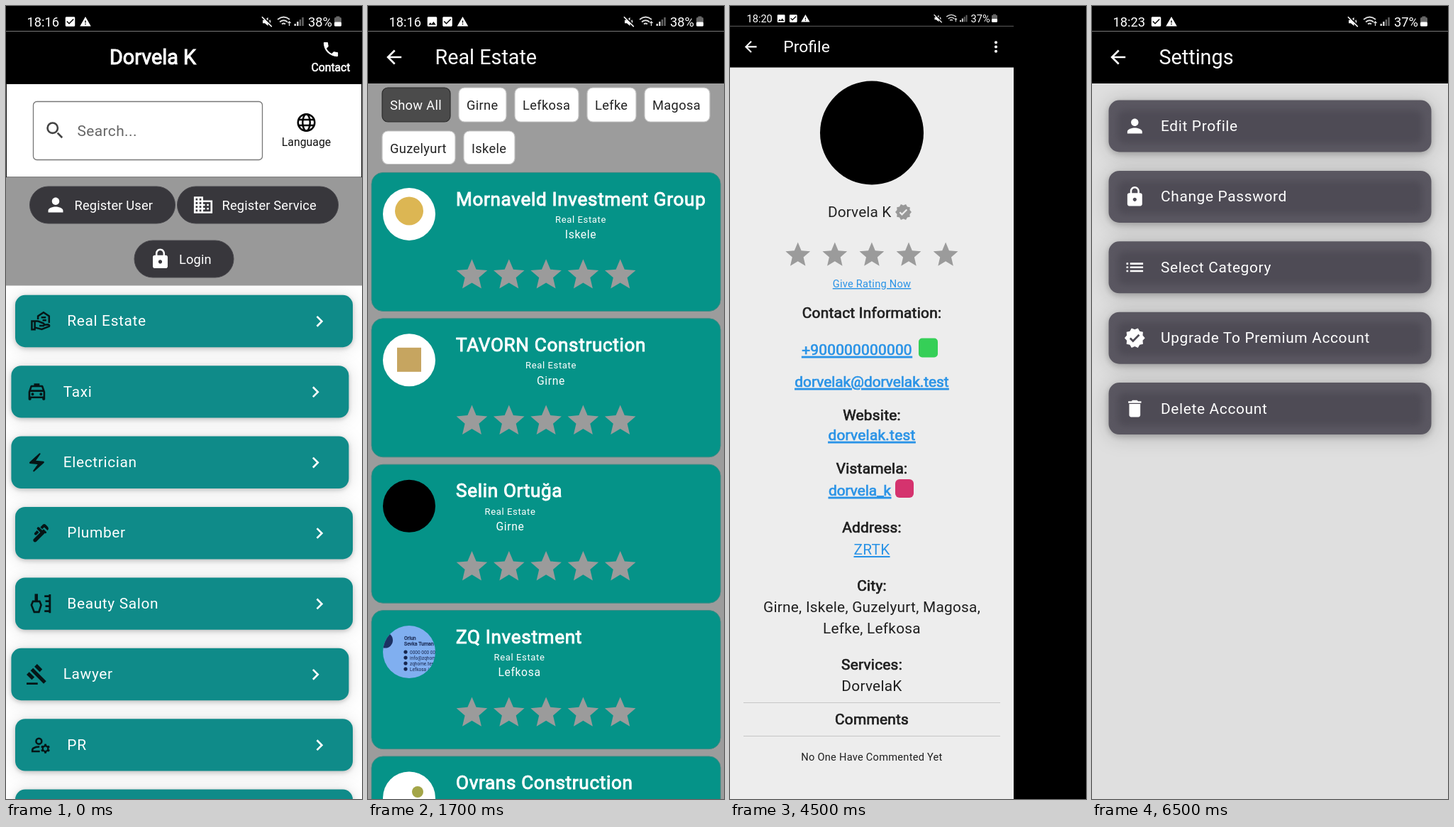
An HTML page that plays this animation: 502 px wide and 1116 px high, repeating every 8000 ms.

```html
<!DOCTYPE html>
<html lang="en">
<head>
<meta charset="utf-8">
<title>App tour</title>
<style>
  html, body { margin: 0; width: 100%; height: 100%; overflow: hidden; background: #000; }
  #strip { display: flex; width: 2510px; height: 1116px; animation: cut 8s step-end infinite; }
  svg { flex: none; width: 502px; height: 1116px; overflow: hidden; }
  text { font-family: Roboto, "Noto Sans", sans-serif; white-space: pre; }
  .tile { filter: drop-shadow(0 2px 3px #0003) drop-shadow(0 1px 11px #0002); }
  .panel { filter: drop-shadow(0 3px 4px #0003) drop-shadow(0 2px 14px #0003); }
  .soft { filter: blur(5px); }
  @keyframes cut {
    0% { transform: translateX(0); }
    6.25% { transform: translateX(-502px); }
    31.25% { transform: translateX(-1004px); }
    56.25% { transform: translateX(-1506px); }
    81.25%, 100% { transform: translateX(-2008px); }
  }
</style>
</head>
<body>
<div id="strip"></div>
<script>
const GEAR = 'M20.75 16c0-.22-.03-.42-.06-.63l1.14-1.01-1-1.73-1.45.49c-.32-.27-.68-.48-1.08-.63L18 11h-2l-.3 1.49c-.4.15-.76.36-1.08.63l-1.45-.49-1 1.73 1.14 1.01c-.03.21-.06.41-.06.63s.03.42.06.63l-1.14 1.01 1 1.73 1.45-.49c.32.27.68.48 1.08.63L16 21h2l.3-1.49c.4-.15.76-.36 1.08-.63l1.45.49 1-1.73-1.14-1.01c.03-.21.06-.41.06-.63zM17 18c-1.1 0-2-.9-2-2s.9-2 2-2 2 .9 2 2-.9 2-2 2z';

const fill = d => `<path d="${d}" fill="currentColor" fill-rule="evenodd"/>`;
const line = (d, w = 2) => `<path d="${d}" fill="none" stroke="currentColor" stroke-width="${w}"/>`;

// Icons on a 24 x 24 grid
const ICONS = {
  phone: fill('M6.62 10.79c1.44 2.83 3.76 5.14 6.59 6.59l2.2-2.2c.27-.27.67-.36 1.02-.24 1.12.37 2.33.57 3.57.57.55 0 1 .45 1 1V20c0 .55-.45 1-1 1-9.39 0-17-7.61-17-17 0-.55.45-1 1-1h3.5c.55 0 1 .45 1 1 0 1.25.2 2.45.57 3.57.11.35.03.74-.25 1.02z'),
  search: line('M14.8 14.8L19.8 19.8') + '<circle cx="9.5" cy="9.5" r="5.5" fill="none" stroke="currentColor" stroke-width="2"/>',
  globe: '<g fill="none" stroke="currentColor" stroke-width="1.9"><circle cx="12" cy="12" r="9"/><ellipse cx="12" cy="12" rx="4" ry="9"/><path d="M4 9h16M4 15h16"/></g>',
  person: fill('M12 12c2.21 0 4-1.79 4-4s-1.79-4-4-4-4 1.79-4 4 1.79 4 4 4zm0 2c-2.67 0-8 1.34-8 4v2h16v-2c0-2.66-5.33-4-8-4z'),
  office: fill('M12 7V3H2v18h20V7zM4 5h2v2H4zM4 9h2v2H4zM4 13h2v2H4zM4 17h2v2H4zM8 5h2v2H8zM8 9h2v2H8zM8 13h2v2H8zM8 17h2v2H8zM20 19h-8v-2h2v-2h-2v-2h2v-2h-2V9h8zM16 11h2v2h-2zM16 15h2v2h-2z'),
  lock: fill('M18 8h-1V6c0-2.76-2.24-5-5-5S7 3.24 7 6v2H6c-1.1 0-2 .9-2 2v10c0 1.1.9 2 2 2h12c1.1 0 2-.9 2-2V10c0-1.1-.9-2-2-2zm-6 9c-1.1 0-2-.9-2-2s.9-2 2-2 2 .9 2 2-.9 2-2 2zm3.1-9H8.9V6c0-1.71 1.39-3.1 3.1-3.1 1.71 0 3.1 1.39 3.1 3.1z'),
  gear: `<g transform="translate(-22 -20) scale(2)">${fill(GEAR)}</g>`,
  chevron: fill('M10 6 8.59 7.41 13.17 12l-4.58 4.59L10 18l6-6z'),
  back: fill('M20 11H7.83l5.59-5.59L12 4l-8 8 8 8 1.41-1.41L7.83 13H20z'),
  star: fill('M12 17.27L18.18 21l-1.64-7.03L22 9.24l-7.19-.61L12 2 9.19 8.63 2 9.24l5.46 4.73L5.82 21z'),
  badge: fill('M23 12l-2.44-2.79.34-3.69-3.61-.82-1.89-3.2L12 2.96 8.6 1.5 6.71 4.69 3.1 5.5l.34 3.7L1 12l2.44 2.79-.34 3.7 3.61.82L8.6 22.5l3.4-1.47 3.4 1.46 1.89-3.19 3.61-.82-.34-3.69zm-12.91 4.72l-3.8-3.81 1.48-1.48 2.32 2.33 5.85-5.87 1.48 1.48z'),
  list: fill('M3 7h2v2H3zM3 11h2v2H3zM3 15h2v2H3zM7 7h14v2H7zM7 11h14v2H7zM7 15h14v2H7z'),
  trash: fill('M6 19c0 1.1.9 2 2 2h8c1.1 0 2-.9 2-2V7H6zM19 4h-3.5l-1-1h-5l-1 1H5v2h14z'),
  more: fill('M10 6a2 2 0 1 0 4 0a2 2 0 1 0-4 0M10 12a2 2 0 1 0 4 0a2 2 0 1 0-4 0M10 18a2 2 0 1 0 4 0a2 2 0 1 0-4 0'),
  house: line('M9 10V6.6L15 2.6l6 4V14M12.5 8h5M14 11h4', 1.9) + line('M2.4 12h3.2v9H2.4zM6 12h3l6 2.4q1.4 1.2 0 2.6h-4.5M15.5 16l4.3-.4q2 .6 1.3 2l-8 3.2-7-1.8', 1.9),
  taxi: fill('M18.92 6.01C18.72 5.42 18.16 5 17.5 5H15V3H9v2H6.5c-.66 0-1.21.42-1.42 1.01L3 12v8c0 .55.45 1 1 1h1c.55 0 1-.45 1-1v-1h12v1c0 .55.45 1 1 1h1c.55 0 1-.45 1-1v-8zM6.85 7h10.29l1.04 3H5.81zM19 17H5v-5h14zM6 14.5a1.5 1.5 0 1 0 3 0a1.5 1.5 0 1 0-3 0M15 14.5a1.5 1.5 0 1 0 3 0a1.5 1.5 0 1 0-3 0'),
  bolt: fill('M14.69 2.21L4.33 11.49c-.64.58-.28 1.65.58 1.73L13 14l-4.85 6.76c-.22.31-.19.74.08 1.01.3.3.77.31 1.08.02l10.36-9.28c.64-.58.28-1.65-.58-1.73L11 10l4.85-6.76c.22-.31.19-.74-.08-1.01a.77.77 0 0 0-1.08-.02z'),
  wrench: fill('M19.28 4.93l-2.12-2.12c-.78-.78-2.05-.78-2.83 0L11.5 5.64l2.12 2.12 2.12-2.12 3.54 3.54a3 3 0 0 0 0-4.25zM5.49 13.77c.59.59 1.54.59 2.12 0l2.47-2.47-2.12-2.13-2.47 2.47c-.59.59-.59 1.54 0 2.13zM15.04 7.76l-1.42 1.42L10.44 6c-.59-.6-1.54-.6-2.12-.01a1.5 1.5 0 0 0 0 2.12l3.18 3.18-7.07 7.07c-.78.78-.78 2.05 0 2.83.78.78 2.05.78 2.83 0L16.45 12a1 1 0 1 0 1.41-1.41z'),
  beauty: fill('M5.5 1.5h3.4V9H5.5z') + line('M3.6 9.5h7.2l1.6 4-2.4 7.5H5L2 13.5z') + line('M21.8 2v20M22 4h-6M22 9.3h-5M22 14.7h-5M22 20h-6', 2.2),
  gavel: fill('M1 21h12v2H1zM5.24 8.07l2.83-2.83 14.14 14.14-2.83 2.83zM12.32 1l5.66 5.66-2.83 2.83-5.66-5.66zM3.83 9.48l5.66 5.66-2.83 2.83L1 12.31z'),
  staff: fill(GEAR) + '<circle cx="10" cy="8" r="3" fill="none" stroke="currentColor" stroke-width="2"/>' + line('M10.6 14Q6.600 13.800 3.900 15.600Q3 16.200 3 17.500V19H11'),
  image: fill('M21 19V5c0-1.1-.9-2-2-2H5c-1.1 0-2 .9-2 2v14c0 1.1.9 2 2 2h14c1.1 0 2-.9 2-2zM8.5 13.5l2.5 3.01L14.5 12l4.5 6H5z'),
  check: fill('M19 3H5c-1.1 0-2 .9-2 2v14c0 1.1.9 2 2 2h14c1.1 0 2-.9 2-2V5c0-1.1-.9-2-2-2zm-9 14l-5-5 1.41-1.41L10 14.17l7.59-7.59L19 8z'),
  warn: fill('M1 21h22L12 2zM13 18h-2v-2h2zM13 14h-2v-4h2z'),
  mute: fill('M4 9v6h4l6 5V4L8 9z') + line('M17 9q2 3 0 6') + '<path d="M3.500 2L22 20.500" stroke="#000" stroke-width="3.500"/>' + line('M2.500 3L21 21.500')
};

const icon = (name, cx, cy, size = 31.4, color = '#fff') =>
  `<g color="${color}" transform="translate(${cx - size / 2} ${cy - size / 2}) scale(${size / 24})">${ICONS[name]}</g>`;

const rect = (x, y, w, h, color, r = 0, more = '') =>
  `<rect x="${x}" y="${y}" width="${w}" height="${h}" rx="${r}" fill="${color}" ${more}/>`;

const disc = (x, y, r, color) => `<circle cx="${x}" cy="${y}" r="${r}" fill="${color}"/>`;

// mid: centred on x, bold: outlined regular weight
function text(s, x, y, size, { color = '#fff', gap = 0, mid, bold, under } = {}) {
  const edge = bold ? `stroke="${color}" stroke-width="${size * .036}"` : '';
  return `<text x="${x}" y="${y}" font-size="${size}" letter-spacing="${gap}" fill="${color}" ${edge}` +
    `${mid ? ' text-anchor="middle"' : ''}${under ? ' text-decoration="underline"' : ''}>${s}</text>`;
}

function statusBar(clock, charge, hasImage) {
  const marks = hasImage ? ['image', 'check', 'warn'] : ['check', 'warn'];
  const bars = [0, 1, 2, 3].map(i =>
    rect(406.5 + i * 3.6, 25 - i * 3, 2.4, 3 + i * 3, i < 2 ? '#ddd' : '#666')).join('');
  return rect(0, 0, 502, 109, '#000') + rect(0, 35, 502, 1, '#777') +
    text(clock, 29.500, 28.700, 18.300) +
    marks.map((m, i) => icon(m, 90.500 + i * 21.500, 22, m === 'warn' ? 17 : 18)).join('') +
    icon('mute', 368, 22, 18) +
    `<g fill="none" stroke="#ddd" stroke-width="1.700"><path d="M383 19q8.500-7 17 0M386 22.500q5.500-4.500 11 0M389 25.500q2.500-2 5 0"/><path d="M399.500 28v-6m-2 2l2-2 2 2" stroke-width="1.300"/></g>` +
    bars + text(charge, 426, 28.700, 18.300) +
    rect(463, 16, 10, 12.500, '#666', 1.500) + rect(465.500, 14.500, 5, 2, '#666') + rect(463, 22.500, 10, 6, '#fff', 1.500);
}

const titleBar = title => icon('back', 36.7, 72) + text(title, 94.5, 81.5, 28.76);

const stars = (x, y, size, step) =>
  [0, 1, 2, 3, 4].map(i => icon('star', x + i * step, y, size, '#9b9b9b')).join('');

const pill = ([name, label, x, y, w]) =>
  rect(x, y, w, 52, '#38373c', 26, 'stroke="#47464b"') +
  icon(name, x + 36.5, y + 26) + text(label, x + 63, y + 33, 18.3, { gap: .15 });

const SERVICES = [['house', 'Real Estate'], ['taxi', 'Taxi'], ['bolt', 'Electrician'], ['wrench', 'Plumber'],
  ['beauty', 'Beauty Salon'], ['gavel', 'Lawyer'], ['staff', 'PR'], ['', '']];

function home(status, pills, shifts) {
  const rows = SERVICES.map(([name, label], i) => {
    const x = 13 + shifts[i] * 5.6, y = 406.8 + i * 99.4;
    return rect(x, y, 476, 73.4, '#0f8b89', 14, 'class="tile"') + (name
      ? icon(name, x + 36, y + 36.7, 31.4, '#061516') +
        text(label, x + 73.3, y + 43.4, 20.9, { gap: .65 }) + icon('chevron', x + 429, y + 37)
      : '');
  }).join('');
  return rect(0, 0, 502, 1116, '#fff') + rows + status +
    text('Dorvela K', 207, 81.5, 28.76, { mid: 1, bold: 1 }) +
    icon('phone', 458, 61, 27) + text('Contact', 458, 91.5, 15.7, { mid: 1, bold: 1 }) +
    rect(.5, 109.5, 501, 131.5, '#fff', 0, 'stroke="#111"') +
    rect(38.5, 134.5, 323, 82, '#fff', 5, 'stroke="#777" stroke-width="1.3"') +
    icon('search', 69, 175, 31.4, '#444') + text('Search...', 100.5, 183, 20.9, { color: '#666', gap: .4 }) +
    icon('globe', 423.5, 164, 31.4, '#000') + text('Language', 423.5, 197, 15.7, { color: '#111', mid: 1, gap: .1 }) +
    rect(0, 241.5, 502, 152, '#999') + pills.map(pill).join('');
}

const CHIPS = [['Show All', 20, 115, 96], ['Girne', 128, 115, 67], ['Lefkosa', 207, 115, 90], ['Lefke', 309, 115, 69],
  ['Magosa', 390, 115, 92], ['Guzelyurt', 20, 176, 103], ['Iskele', 135, 176, 72]];

const chip = ([label, x, y, w], i) =>
  rect(x, y, w, y < 150 ? 48 : 46.5, i ? '#fff' : '#4b4b4b', 8, `stroke="${i ? '#c4c4c4' : '#2b2b2b'}" stroke-width="1.2"`) +
  text(label, x + 11, y + 30.6, 18.3, { color: i ? '#222' : '#fff', gap: .33 });

function cardFace() {
  const lines = ['0000 000 00 00', 'info@zqhome', 'zqhome.test', 'Lefkosa /'];
  return disc(58, 58.5, 37, '#80aff0') + '<g clip-path="url(#round)">' + disc(24, 42, 11, '#1c3162') +
    ['Orlun', 'Sevka Tuman'].map((s, i) => text(s, 51, 41 + i * 8, 7, { color: '#16254c', bold: 1 })).join('') +
    lines.map((s, i) => disc(53, 58.5 + i * 8, 2.6, '#16254c') + text(s, 59, 61 + i * 8, 6.5, { color: '#16254c' })).join('') + '</g>';
}

const white = disc(58, 58.5, 37, '#fff');
const FIRMS = [
  ['Mornaveld Investment Group', 'Iskele', 300, white + disc(58, 54, 20, '#dcb653')],
  ['TAVORN Construction', 'Girne', 258, white + rect(41, 41, 34, 34, '#c6a560')],
  ['Selin Ortuğa', 'Girne', 200.5, disc(58, 58.5, 37, '#000')],
  ['ZQ Investment', 'Lefkosa', 213.5, cardFace()],
  ['Ovrans Construction', '', 248, white + disc(70, 50, 8, '#a3a548')]
];

const firm = ([name, city, mid, face], i) =>
  `<g transform="translate(0 ${234.4 + i * 205.4})">` +
  rect(5, 0, 492, 195, '#059388', 16, 'stroke="#3f8a84" stroke-width="1"') + face +
  text(name, 124, 46.3, 26.15, { gap: .65, bold: 1 }) +
  text('Real Estate', mid, 70.6, 13.07, { gap: .62, mid: 1 }) +
  text(city, mid, 92.8, 15.7, { gap: .62, mid: 1 }) + stars(146.5, 143.6, 52.3, 52.3) + '</g>';

const directory = () =>
  '<clipPath id="round"><circle cx="58" cy="58.5" r="37"/></clipPath>' +
  rect(0, 0, 502, 1116, '#9c9c9c') + statusBar('18:16', '38%', true) + titleBar('Real Estate') +
  CHIPS.map(chip).join('') + FIRMS.map(firm).join('');

function profile() {
  const row = (s, y, opts, x = 200, size = 20.83) => text(s, x, y, size, { color: '#1f1f1f', gap: .26, mid: 1, ...opts });
  const bold = { bold: 1 }, thin = { color: '#2a93e6', under: 1 }, link = { ...thin, bold: 1 };
  return rect(0, 0, 502, 1116, '#000') +
    `<g transform="scale(.797)">${statusBar('18:20', '37%', true)}${titleBar('Profile')}</g>` +
    rect(400, 0, 102, 100, '#000') + rect(0, 86.5, 400, 1030, '#ededed') +
    icon('more', 375, 57.5, 25) + disc(200, 178.5, 73, '#000') +
    text('Dorvela K', 138, 297, 20.83, { color: '#222', gap: .1 }) + icon('badge', 244.5, 290, 25, '#989898') +
    stars(95.7, 350, 41.7, 52.1) +
    row('Give Rating Now', 396, thin, 200, 14.6) +
    row('Contact Information:', 439, bold) +
    row('+900000000000', 491, link, 179) + rect(266, 467.5, 27, 27, '#35cf57', 5) +
    row('dorvelak@dorvelak.test', 536, { ...link, gap: 0 }) +
    row('Website:', 583, bold) + row('dorvelak.test', 611, link) +
    row('Vistamela:', 658, bold) + row('dorvela_k', 689, { ...link, gap: 0 }, 183) + rect(233, 666, 26, 26, '#d5336e', 6) +
    row('Address:', 741, bold) + row('ZRTK', 772, thin) +
    row('City:', 822.5, bold) + row('Girne, Iskele, Guzelyurt, Magosa,', 853, {}) + row('Lefke, Lefkosa', 883, {}) +
    row('Services:', 934, bold) + row('DorvelaK', 964, {}) +
    rect(19, 980, 362, 1, '#c6c6c6') + row('Comments', 1011, bold) + rect(19, 1027, 362, 1, '#c6c6c6') +
    row('No One Have Commented Yet', 1062, {}, 200, 14.6);
}

const OPTIONS = [['person', 'Edit Profile'], ['lock', 'Change Password'], ['list', 'Select Category'],
  ['badge', 'Upgrade To Premium Account'], ['trash', 'Delete Account']];

function option([name, label], i) {
  const y = 132.5 + i * 99.4;
  return rect(23.5, y, 455, 73, '#5a5761', 15, 'class="panel"') +
    rect(36, y + 14, 430, 47, '#4e4b55', 10, 'class="soft"') +
    icon(name, 60.3, y + 36.5) + text(label, 97, y + 43.4, 20.9, { gap: .65 });
}

const settings = () =>
  rect(0, 0, 502, 1116, '#dfdfdf') + OPTIONS.map(option).join('') +
  statusBar('18:23', '37%', false) + titleBar('Settings');

const scenes = [
  home(statusBar('18:16', '38%', false),
    [['person', 'Register User', 33.5, 254, 205], ['office', 'Register Service', 241.5, 254, 227], ['lock', 'Login', 181, 330, 140]],
    [0, -1, -1, 0, 0, -1, 0, 0]),
  directory(),
  home(statusBar('18:23', '37%', true),
    [['person', 'Profile', 57.5, 254, 149], ['gear', 'Account Settings', 209.5, 254, 235], ['lock', 'Logout', 174.5, 330, 153]],
    [0, 1, 1, -1, -1, 1, 0, 0]),
  profile(),
  settings()
];
document.getElementById('strip').innerHTML =
  scenes.map(s => `<svg viewBox="0 0 502 1116">${s}</svg>`).join('');
</script>
</body>
</html>
```
